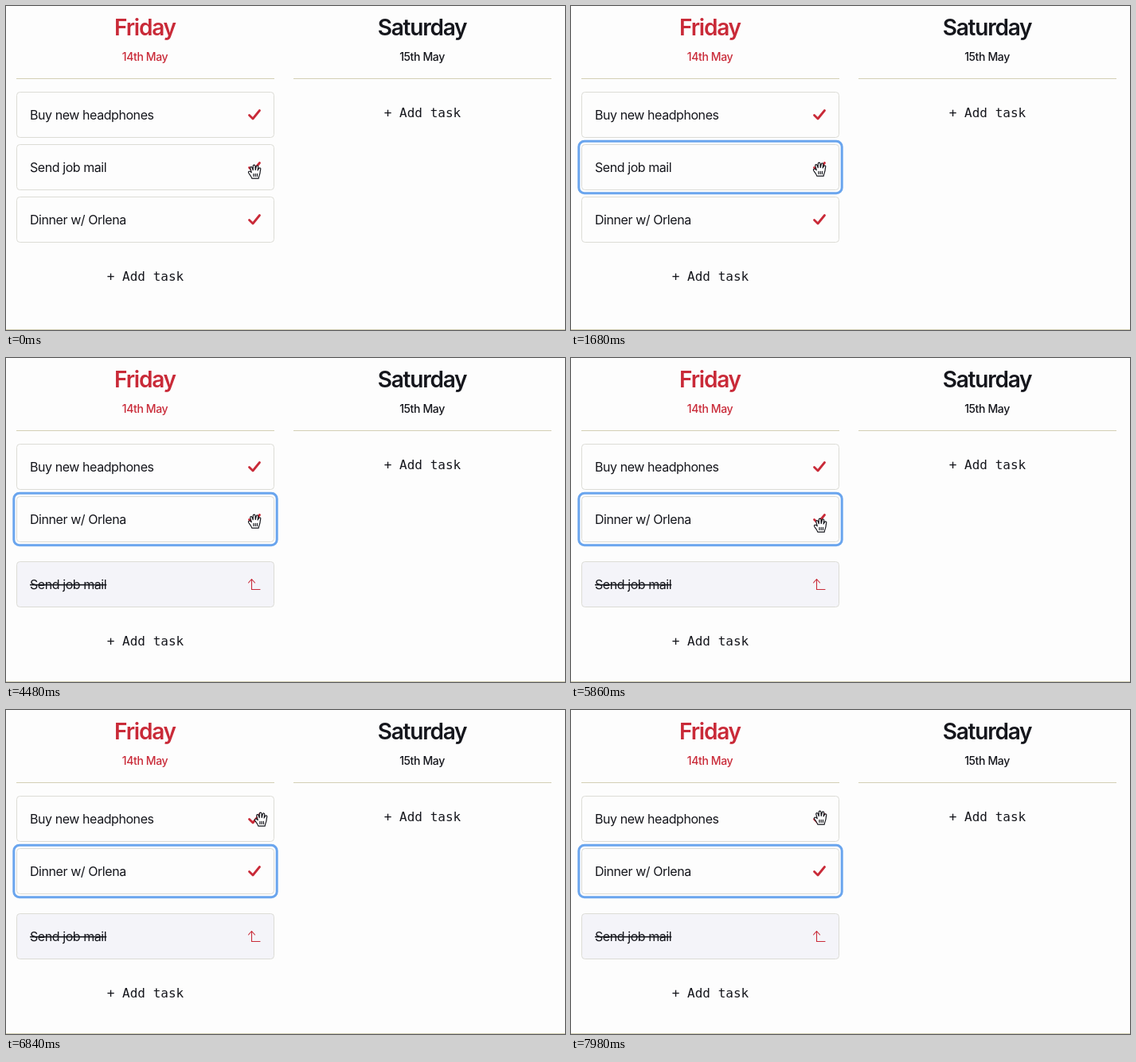
An HTML page that plays this animation: 702 by 408 pixels, repeating every 8000 ms.

```html
<!DOCTYPE html>
<html lang="en">
<head>
<meta charset="utf-8">
<title>Week planner</title>
<style>
  html, body { margin: 0; width: 100%; height: 100%; overflow: hidden; background: #fdfdfd; }
  svg { display: block; }
  text { font: 16px Inter, sans-serif; letter-spacing: -.027em; fill: #15161c; }
  .day { font-size: 28px; font-weight: 600; letter-spacing: -.043em; }
  .date { font-size: 14px; font-weight: 500; letter-spacing: -.027em; }
  .day, .date, .add { text-anchor: middle; }
  .add { font: 16px "DejaVu Sans Mono", monospace; letter-spacing: 0; }
  .today { fill: #c92a38; }
  .card rect { fill: #fdfdfd; stroke: #dcdcd6; }
  .done rect { fill: #f4f4f9; }
  .done text { text-decoration: line-through; }
  .icon { fill: none; stroke: #c92a38; stroke-width: 2.8; stroke-linecap: round; stroke-linejoin: round; }
  .done .icon { stroke-width: 1.1; }
  .rule { stroke: #d3cfb4; }
  #ring { fill: none; stroke: #6aa5ee; stroke-width: 3; }
  #hand { fill: #fff; stroke: #15161c; stroke-width: 1.1; stroke-linejoin: round; stroke-linecap: round; }
</style>
</head>
<body>
<svg width="702" height="408" viewBox="0 0 702 408">
  <text class="day today" x="174.5" y="37">Friday</text>
  <text class="date today" x="174.5" y="69">14th May</text>
  <text class="day" x="522.5" y="37">Saturday</text>
  <text class="date" x="522.5" y="69">15th May</text>
  <path class="rule" d="M13 91.5H337M361 91.5H685M0 407.5H702"/>
  <text class="add" x="523" y="140">+ Add task</text>
  <g id="before"></g>
  <g id="after"></g>
  <rect id="ring" x="9.8" y="170.3" width="330.4" height="65.4" rx="7"/>
  <g id="hand">
    <path d="M4.5 17C4 15 3 13.5 1 11C0 9.6.3 8.5 1.6 8.4C2.6 8.4 3.4 9.3 4 10L2.6 5C2.2 3.4 4.2 2.6 4.8 4.2L5.8 7.2L5.9 2.4C5.9.6 8.2.6 8.3 2.3L8.6 7L9.7 2.8C10.1 1.2 12.1 1.7 11.9 3.3L11.3 7.5L12.6 5.3C13.5 3.9 15.2 4.8 14.7 6.3C14 8.5 14.4 10.5 13.5 12.5C13 14 12.5 15 12.3 17Z"/>
    <path d="M6.5 11.5V14.5M8.6 11.5V14.5M10.7 11.5V14.5"/>
  </g>
</svg>
<script>
const LOOP = 8000, FOCUS_AT = 1460, DONE_AT = 1720;
const $ = id => document.getElementById(id);

const CHECK = "M305.5 29.5L310 34L318.5 23.5";
const UNDO = "M304.5 27L308.5 22.5L312.5 27M308.5 22.5V35.5H319";

const card = (label, y, done) => `
  <g class="card ${done ? "done" : ""}" transform="translate(0 ${y})">
    <rect x="13.5" y=".5" width="323" height="57" rx="4"/>
    <text x="30" y="35">${label}</text>
    <path class="icon" d="${done ? UNDO : CHECK}"/>
  </g>`;
const add = y => `<text class="add" x="175" y="${y}">+ Add task</text>`;

const [shop, mail, dinner] = ["Buy new headphones", "Send job mail", "Dinner w/ Orlena"];
$("before").innerHTML = card(shop, 108) + card(mail, 174) + card(dinner, 240) + add(346);
$("after").innerHTML = card(shop, 108) + card(dinner, 174) + card(mail, 256, true) + add(362);

// Pointer stops: time, x, y
const stops = [
  [0, 304, 199], [840, 304, 199], [1300, 304, 196], [5760, 304, 196],
  [5900, 306, 203], [6180, 317, 170], [6360, 318, 138], [6460, 316, 132],
  [6580, 316, 132], [7000, 309, 125], [7280, 307, 125],
  [7400, 307, 125], [7700, 305, 126], [LOOP, 305, 126]
];

function pointer(t) {
  const i = stops.findIndex(s => s[0] > t);
  const [t0, x0, y0] = stops[i - 1], [t1, x1, y1] = stops[i];
  const k = (t - t0) / (t1 - t0);
  return [x0 + (x1 - x0) * k, y0 + (y1 - y0) * k].map(Math.round);
}

const show = (id, on) => $(id).setAttribute("visibility", on ? "visible" : "hidden");

function draw(now) {
  const t = now % LOOP;
  show("ring", t >= FOCUS_AT);
  show("before", t < DONE_AT);
  show("after", t >= DONE_AT);
  $("hand").setAttribute("transform", `translate(${pointer(t)}) scale(1.07)`);
  requestAnimationFrame(draw);
}
draw(0);
</script>
</body>
</html>
```
